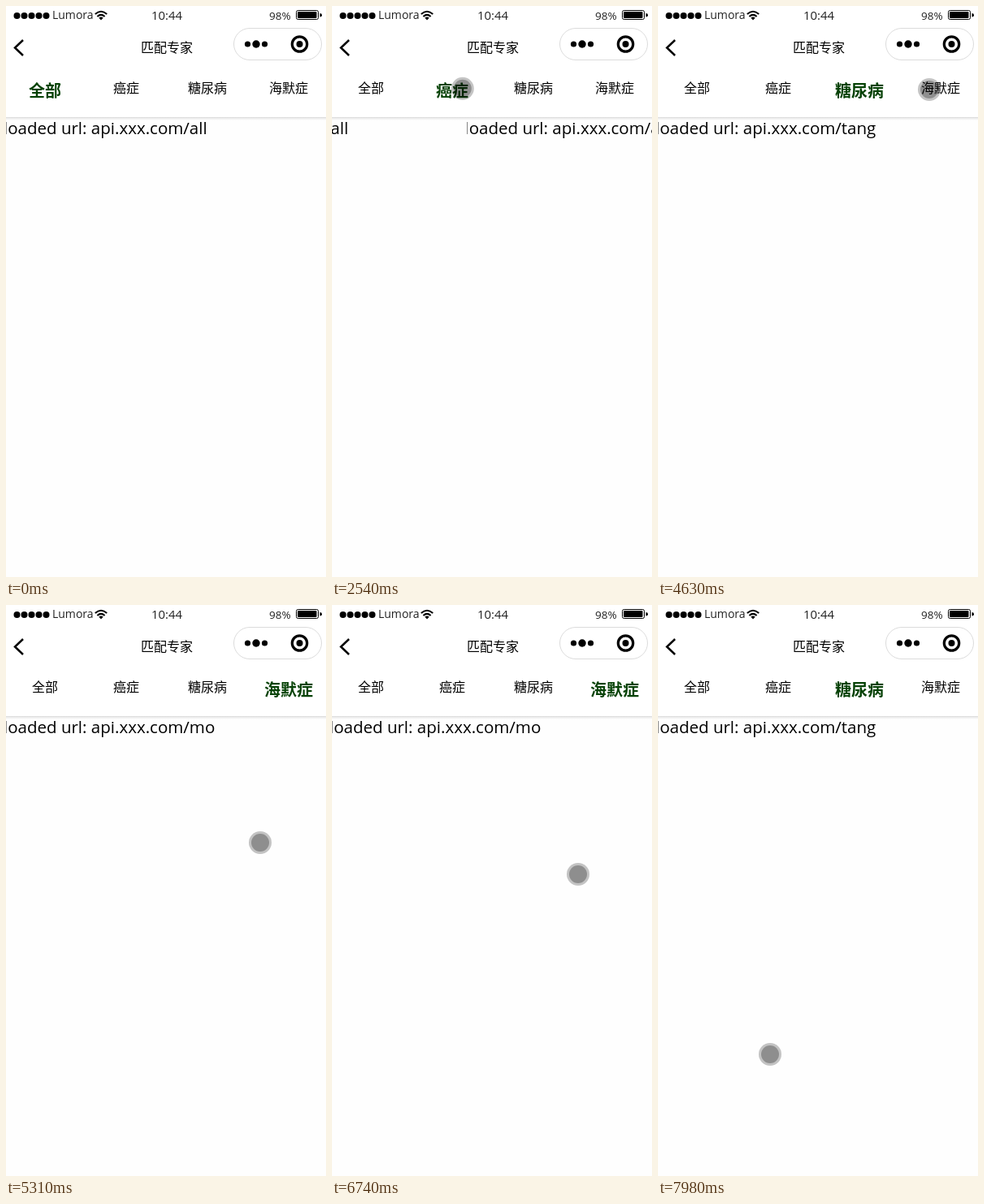
Animation of 394 by 704 pixels, one loop 8000 ms. Source, as an HTML page:

```html
<!DOCTYPE html>
<html lang="zh-CN">
<head>
<meta charset="utf-8">
<title>匹配专家</title>
<style>
html, body { margin: 0; width: 100%; height: 100%; overflow: hidden; background: #fefefe; }
svg { display: block; overflow: hidden; }
text { font-family: "Open Sans", "Noto Sans", sans-serif; fill: #000; }
.status text { fill: #222; }
.cjk { font-family: "Noto Sans CJK SC", "Noto Sans CJK", sans-serif; font-size: 16px; text-anchor: middle; }
.active { font-size: 20px; font-weight: 700; fill: #064206; }
.page { font-size: 20.5px; }
</style>
</head>
<body>
<svg width="394" height="704" viewBox="0 0 394 704">
  <defs>
    <linearGradient id="shade" x1="0" y1="0" x2="0" y2="1">
      <stop offset="0" stop-color="#e2e2e2"/>
      <stop offset="1" stop-color="#fefefe"/>
    </linearGradient>
  </defs>
  <rect width="394" height="704" fill="#fefefe"/>
  <rect width="394" height="137" fill="#fff"/>
  <rect y="137" width="394" height="4" fill="url(#shade)"/>
  <rect y="137" width="394" height="1" fill="#dedede"/>

  <g class="status">
    <g id="signal"></g>
    <text x="57" y="16" font-size="14">Lumora</text>
    <g fill="none" stroke="#000" stroke-width="2">
      <path d="M109.8 10 Q117 3.4 124.2 10"/>
      <path d="M112.4 13 Q117 8.8 121.6 13"/>
    </g>
    <path d="M114.3 14.4 Q117 12.4 119.7 14.4 L117 17.4Z"/>
    <text x="198" y="17" font-size="14.9" text-anchor="middle">10:44</text>
    <text x="324" y="17" font-size="13.5">98%</text>
    <rect x="357.5" y="5.5" width="27" height="11" rx="2" fill="none" stroke="#000"/>
    <rect x="359" y="7" width="23.5" height="8" rx="1"/>
    <path d="M386.5 9 Q389 9 389 11.2 Q389 13.5 386.5 13.5Z"/>
  </g>

  <path d="M21 42 L11 51.5 L21 61" fill="none" stroke="#000" stroke-width="2.5"/>
  <text class="cjk" x="198" y="57.3">匹配专家</text>
  <rect x="280.5" y="27.5" width="108" height="39" rx="19.5" fill="#fff" stroke="#dcdcdc"/>
  <circle cx="297.5" cy="47" r="3.6"/>
  <circle cx="308" cy="47" r="4.7"/>
  <circle cx="318.5" cy="47" r="3.6"/>
  <circle cx="361.5" cy="47" r="9.2" fill="none" stroke="#000" stroke-width="3.2"/>
  <circle cx="361.5" cy="47" r="4"/>

  <g id="tabs"></g>
  <g id="pages"></g>
  <g id="touch">
    <circle id="halo"/>
    <circle id="core"/>
  </g>
</svg>
<script>
const LOOP = 8000, STEP = 67.2, WIDTH = 394, SLIDE = 500;
const NS = 'http://www.w3.org/2000/svg';
const $ = id => document.getElementById(id);

function set(el, attrs) {
  for (const k in attrs) el.setAttribute(k, attrs[k]);
  return el;
}
function add(parent, tag, attrs, text = '') {
  const el = set(document.createElementNS(NS, tag), attrs);
  el.textContent = text;
  return parent.appendChild(el);
}

for (let i = 0; i < 5; i++) add($('signal'), 'circle', { cx: 13.5 + 9 * i, cy: 12, r: 4 });

const tabs = ['全部', '癌症', '糖尿病', '海默症'].map((name, i) =>
  add($('tabs'), 'text', { x: 48 + 100 * i }, name));

// Each page is its own viewport, so its text is cut at the page edge.
['all', 'ai', 'tang', 'mo'].forEach((path, i) => {
  const page = add($('pages'), 'svg', { x: WIDTH * i, width: WIDTH, height: 704 });
  add(page, 'text', { class: 'page', x: -3, y: 158 }, 'loaded url: api.xxx.com/' + path);
});

// Pointer moves: start, end, x, y
const moves = [
  [250, 317, 267, 576], [520, 915, 306, 531], [1130, 1590, 322, 463],
  [1740, 2260, 148, 101], [2420, 2930, 247, 107], [3530, 3990, 334, 103],
  [4810, 5280, 313, 293],
  [5780, 5920, 270, 272], [5920, 6080, 241, 318], [6080, 6290, 266, 456], [6290, 6690, 303, 332],
  [6740, 6940, 250, 404], [7010, 7400, 375, 411], [7440, 7970, 138, 554]
];
const taps = [2410, 3470, 4750];
const drag = { from: 7010, to: 7440, x0: 250, x1: 375 };

const clamp = u => Math.min(1, Math.max(0, u));
const smooth = u => u * u * (3 - 2 * u);
const easeOut = u => 1 - (1 - u) ** 3;
const mix = (a, b, u) => a + (b - a) * u;

function pointer(t) {
  return moves.reduce(([px, py], [from, to, x, y]) => {
    const u = smooth(clamp((t - from) / (to - from)));
    return [mix(px, x, u), mix(py, y, u)];
  }, [275, 561]);
}

function pagePos(t, x) {
  const slide = from => easeOut(clamp((t - from) / SLIDE));
  const pos = taps.reduce((sum, tap) => sum + slide(tap), 0);
  if (t < drag.from) return pos;
  if (t < drag.to) return pos - (x - drag.x0) / WIDTH;
  return mix(pos - (drag.x1 - drag.x0) / WIDTH, pos - 1, slide(drag.to));
}

function draw(now) {
  // The screen refreshes in steps, the first at 250 ms.
  const t = 250 + Math.floor((now % LOOP - 240) / STEP) * STEP;

  const active = taps.filter(tap => t >= tap).length - (t >= drag.to + 40 ? 1 : 0);
  tabs.forEach((el, i) => set(el, i === active
    ? { class: 'cjk active', y: 111.5 }
    : { class: 'cjk', y: 107.3 }));

  const [x, y] = pointer(t);
  set($('pages'), { transform: `translate(${-pagePos(t, x) * WIDTH} 0)` });

  const down = taps.some(tap => t >= tap - 80 && t < tap + 60)
    || t >= drag.from - 50 && t < drag.to;
  set($('touch'), {
    transform: `translate(${x} ${y})`,
    visibility: t < 250 ? 'hidden' : 'visible'
  });
  set($('halo'), down
    ? { r: 15, fill: 'rgba(190,190,0,.6)' }
    : { r: 14, fill: 'rgba(0,0,0,.23)' });
  set($('core'), down
    ? { r: 12.5, fill: 'rgba(165,165,20,.5)' }
    : { r: 11, fill: 'rgba(0,0,0,.27)' });
}

const start = performance.now();
function tick() {
  draw(performance.now() - start);
  requestAnimationFrame(tick);
}
tick();
</script>
</body>
</html>
```
